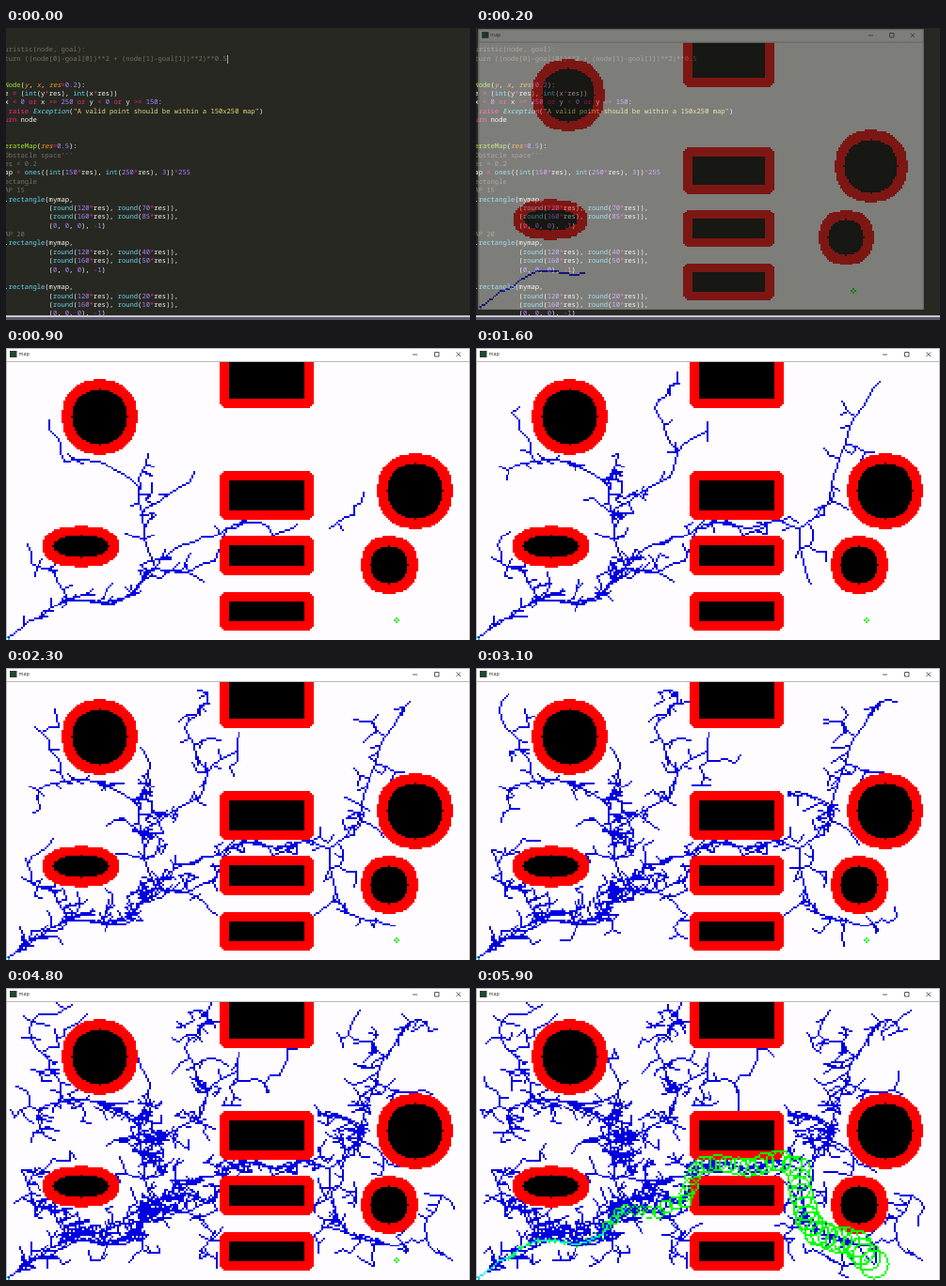
An HTML page with a canvas for the animation above (6000 ms loop, 493 px wide and 311 px high).

```html
<!DOCTYPE html>
<html lang="en">
<head>
<meta charset="utf-8">
<title>map</title>
<style>
html, body { margin: 0; width: 100%; height: 100%; overflow: hidden; background: #272822; }
#stage { position: relative; width: 493px; height: 311px; overflow: hidden; }
#code {
  position: absolute; left: -31.7px; top: 19.2px; margin: 0; color: #f8f8f2;
  font: 7.167px/9.37px "Noto Sans Mono", "DejaVu Sans Mono", monospace;
  text-rendering: geometricPrecision;
}
.com { color: #75715e; } .str { color: #e6db74; } .num { color: #ae81ff; }
.op { color: #f92672; } .fn { color: #66d9ef; } .def { color: #a6e22e; }
.arg { color: #fd971f; font-style: italic; } .type { color: #66d9ef; font-style: italic; }
#cursor { position: absolute; left: 235px; top: 29px; width: 1px; height: 9px; background: #a8a8a2; }
#bar { position: absolute; left: 0; top: 306px; width: 493px; height: 2px; background: #c6c5d2; border-bottom: 3px solid #5c5a68; }
#win { position: absolute; inset: 0; background: #fff; transform-origin: 60px 30px; }
#win span { position: absolute; left: 13.5px; top: 2px; font: 5.4px/9px "Open Sans", sans-serif; color: #222; }
#win svg { position: absolute; left: 0; top: 0; }
#map { position: absolute; left: 0; top: 15px; width: 493px; height: 296px; image-rendering: pixelated; }
</style>
</head>
<body>
<div id="stage">
  <pre id="code"></pre>
  <div id="cursor"></div>
  <div id="bar"></div>
  <div id="win">
    <canvas id="map" width="250" height="150"></canvas>
    <span>map</span>
    <svg width="493" height="311" fill="none" stroke="#333" stroke-width=".8">
      <rect x="4" y="3" width="7.5" height="7" fill="#24452f" stroke="none"/>
      <path d="M432 7h5M455.5 4.5h4.5v4.5h-4.5zM478.5 4.5l4.5 4.5m0-4.5l-4.5 4.5"/>
      <path d="M0 .5H493M0 14.5H493M.5 0V311M492.5 0V311" stroke="#a9a9a9"/>
    </svg>
  </div>
</div>
<script>
// ---- Editor text ----
const box = (a, b) => `    cv2.rectangle(mymap,
                  (round(120*res), round(${a}*res)),
                  (round(160*res), round(${b}*res)),
                  (0, 0, 0), -1)`;
const source = `#def heuristic(node, goal):
#    return ((node[0]-goal[0])**2 + (node[1]-goal[1])**2)**0.5


def getNode(y, x, res=0.2):
    node = (int(y*res), int(x*res))
    if x < 0 or x >= 250 or y < 0 or y >= 150:
        raise Exception("A valid point should be within a 150x250 map")
    return node


def generateMap(res=0.5):
    '''Obstacle space'''
    # res = 0.2
    mymap = ones((int(150*res), int(250*res), 3))*255
    # rectangle
    # GAP 15
${box(70, 85)}
    # GAP 20
${box(40, 50)}

${box(20, 10)}`;

const rules = {
  com: "#.*|'''.*'''", str: '".*?"', type: "\\b(?:def|Exception)\\b",
  def: "\\b(?:getNode|generateMap)\\b", arg: "(?<=def .*)\\b(?:x|y|res)\\b",
  fn: "\\b(?:int|round|ones|rectangle)\\b",
  op: "\\b(?:if|or|raise|return)\\b|[-+*<>=]+", num: "\\b\\d+(?:\\.\\d+)?\\b"
};
const lexer = new RegExp(Object.entries(rules).map(([k, r]) => `(?<${k}>${r})`).join("|"), "g");
const escapeHtml = s => s.replace(/&/g, "&amp;").replace(/</g, "&lt;").replace(/>/g, "&gt;");
document.getElementById("code").innerHTML = source.replace(lexer, (m, ...rest) => {
  const groups = rest[rest.length - 1];
  const kind = Object.keys(groups).find(k => groups[k] !== undefined);
  return `<span class="${kind}">${escapeHtml(m)}</span>`;
});

// ---- Obstacles on a 250 x 150 grid, each with a 5-cell safety margin ----
const W = 250, H = 150, MARGIN = 5;
const slabs = [[0, 19], [64, 79], [99, 109], [129, 139]];
const ovals = [[50, 29, 15, 15], [220, 69, 15, 15], [206, 109, 10, 10], [40, 99, 15, 6]];
const solid = (x, y) =>
  (x >= 120 && x <= 160 && slabs.some(([a, b]) => y >= a && y <= b)) ||
  ovals.some(([cx, cy, a, b]) => ((x - cx) / a) ** 2 + ((y - cy) / b) ** 2 <= 1);

const grid = new Uint8Array(W * H);
for (let y = 0; y < H; y++) for (let x = 0; x < W; x++) {
  if (!solid(x, y)) continue;
  for (let dy = -MARGIN; dy <= MARGIN; dy++) for (let dx = -MARGIN; dx <= MARGIN; dx++) {
    const j = y + dy;
    if (dx * dx + dy * dy <= 34 && j >= 0 && j < H) grid[j * W + x + dx] ||= 1;
  }
  grid[y * W + x] = 2;
}
const walls = document.createElement("canvas");
walls.width = W; walls.height = H;
const wallCtx = walls.getContext("2d");
grid.forEach((v, i) => {
  if (!v) return;
  wallCtx.fillStyle = v === 2 ? "#000" : "#f00";
  wallCtx.fillRect(i % W, Math.floor(i / W), 1, 1);
});

// ---- Search tree ----
let seed = 20;
const rnd = () => {
  seed = (seed + 0x6D2B79F5) | 0;
  let t = Math.imul(seed ^ (seed >>> 15), 1 | seed);
  t = (t + Math.imul(t ^ (t >>> 7), 61 | t)) ^ t;
  return ((t ^ (t >>> 14)) >>> 0) / 4294967296;
};

const STEP = 5, DONE = 5700;

// Splits a polyline into steps of about STEP cells with some wobble.
function walk(points) {
  const out = [points[0]];
  for (let i = 1; i < points.length; i++) {
    const [ax, ay] = points[i - 1], [bx, by] = points[i];
    const n = Math.max(1, Math.round(Math.hypot(bx - ax, by - ay) / STEP));
    for (let k = 1; k <= n; k++) {
      const j = k < n ? 2 : 0;
      out.push([ax + (bx - ax) * k / n + (rnd() - .5) * j, ay + (by - ay) * k / n + (rnd() - .5) * j]);
    }
  }
  return out;
}

const edges = [];
function grow(pts, timeAt) {
  for (let i = 1; i < pts.length; i++)
    edges.push({ a: pts[i - 1], b: pts[i], t: timeAt(i, i / (pts.length - 1)) });
}

// The way to the goal; its last stretch is found at the very end.
const route = walk([
  [1, 148], [33, 128], [54, 130], [68, 125], [80, 111], [98, 113], [112, 107], [118, 90],
  [130, 86], [146, 89], [161, 85], [174, 89], [177, 111], [183, 124], [205, 130], [214, 141]
]);
grow(route, (i, s) => s < .93 ? 300 * (s / .3) ** 1.6 : DONE);

// Early side limbs, one step every 25 ms.
const limb = (start, ...points) => grow(walk(points), i => start + 25 * i);
limb(300, [80, 111], [74, 90], [71, 67], [53, 54], [31, 53], [27, 40]);
limb(400, [33, 128], [26, 113], [13, 108]);
limb(720, [72, 82], [84, 73], [104, 62], [108, 48], [96, 25], [108, 10]);
limb(850, [174, 89], [189, 76], [200, 38], [217, 10]);

const free = (x, y) => x >= 0 && y >= 0 && x < W && y < H && !grid[Math.floor(y) * W + Math.floor(x)];
function clear([ax, ay], [bx, by]) {
  for (let k = 1; k <= 6; k++)
    if (!free(ax + (bx - ax) * k / 6, ay + (by - ay) * k / 6)) return false;
  return true;
}
function nearest(nodes, [x, y]) {
  const dist = n => (n[0] - x) ** 2 + (n[1] - y) ** 2;
  return nodes.reduce((best, n) => dist(n) < dist(best) ? n : best);
}

// Some steps explore towards a random point, the others thicken what is there.
for (let t = 300; t <= DONE; t += 100) {
  const nodes = edges.filter(e => e.t <= t).map(e => e.b);
  const size = .27 * (t - 200);
  for (let tries = 0; nodes.length < size && tries < 400; tries++) {
    const aim = [rnd() * W, rnd() * H];
    const from = rnd() < .35 ? nearest(nodes, aim) : nodes[Math.floor(rnd() * nodes.length)];
    const dx = aim[0] - from[0], dy = aim[1] - from[1], d = Math.hypot(dx, dy);
    if (d < 2.5) continue;
    const s = Math.min(1, STEP / d);
    const next = [from[0] + dx * s, from[1] + dy * s];
    if (!clear(from, next)) continue;
    nodes.push(next);
    edges.push({ a: from, b: next, t });
  }
}

// ---- Drawing ----
const ctx = document.getElementById("map").getContext("2d");
const win = document.getElementById("win");
const cursor = document.getElementById("cursor");
const dot = (x, y) => ctx.fillRect(Math.floor(x), Math.floor(y), 1, 1);

function line([ax, ay], [bx, by]) {
  const x0 = Math.floor(ax), y0 = Math.floor(ay), dx = Math.floor(bx) - x0, dy = Math.floor(by) - y0;
  const n = Math.max(Math.abs(dx), Math.abs(dy), 1);
  for (let k = 0; k <= n; k++) dot(x0 + Math.round(dx * k / n), y0 + Math.round(dy * k / n));
}
function ring([x, y], r) {
  const n = Math.max(4, Math.floor(r) * 8 - 4);
  for (let k = 0; k < n; k++) {
    const a = k / n * 2 * Math.PI;
    dot(Math.floor(x) + Math.round(r * Math.cos(a)), Math.floor(y) + Math.round(r * Math.sin(a)));
  }
}

function draw(t) {
  cursor.style.visibility = t < 100 ? "visible" : "hidden";
  win.style.visibility = t < 200 ? "hidden" : "visible";
  win.style.opacity = t < 300 ? .4 : t < 400 ? .82 : 1;
  win.style.transform = t < 300 ? "scale(.96)" : t < 400 ? "scale(.991)" : "none";

  ctx.fillStyle = "#fffcff";
  ctx.fillRect(0, 0, W, H);
  ctx.fillStyle = "#0000e0";
  for (const e of edges) if (e.t <= t) line(e.a, e.b);
  ctx.drawImage(walls, 0, 0);
  ctx.fillStyle = "#0e0";
  ring([210, 139], 1);
  ctx.fillStyle = "#0cc";
  ring([0, 149], 1);

  // Trace the way back from the goal; the circles shrink towards the start.
  const last = route.length - 1;
  const seen = Math.max(0, (t - DONE) / 200);
  for (let i = last; i > last * (1 - seen); i--) {
    const s = i / last;
    ctx.fillStyle = "#0f0";
    ring(route[i], 7.5 * s);
    if (s < .35) {
      ctx.fillStyle = "#0ee";
      line(route[i - 1], route[i]);
    }
  }
}

let shown = -1;
function play(now) {
  const t = Math.floor(now % 6000 / 100) * 100;
  if (t !== shown) draw(shown = t);
  requestAnimationFrame(play);
}
const begin = performance.now();
const tick = () => Math.max(0, performance.now() - begin);
function loop() {
  const t = Math.floor(tick() % 6000 / 100) * 100;
  if (t !== shown) draw(shown = t);
  requestAnimationFrame(loop);
}
loop();
</script>
</body>
</html>
```
